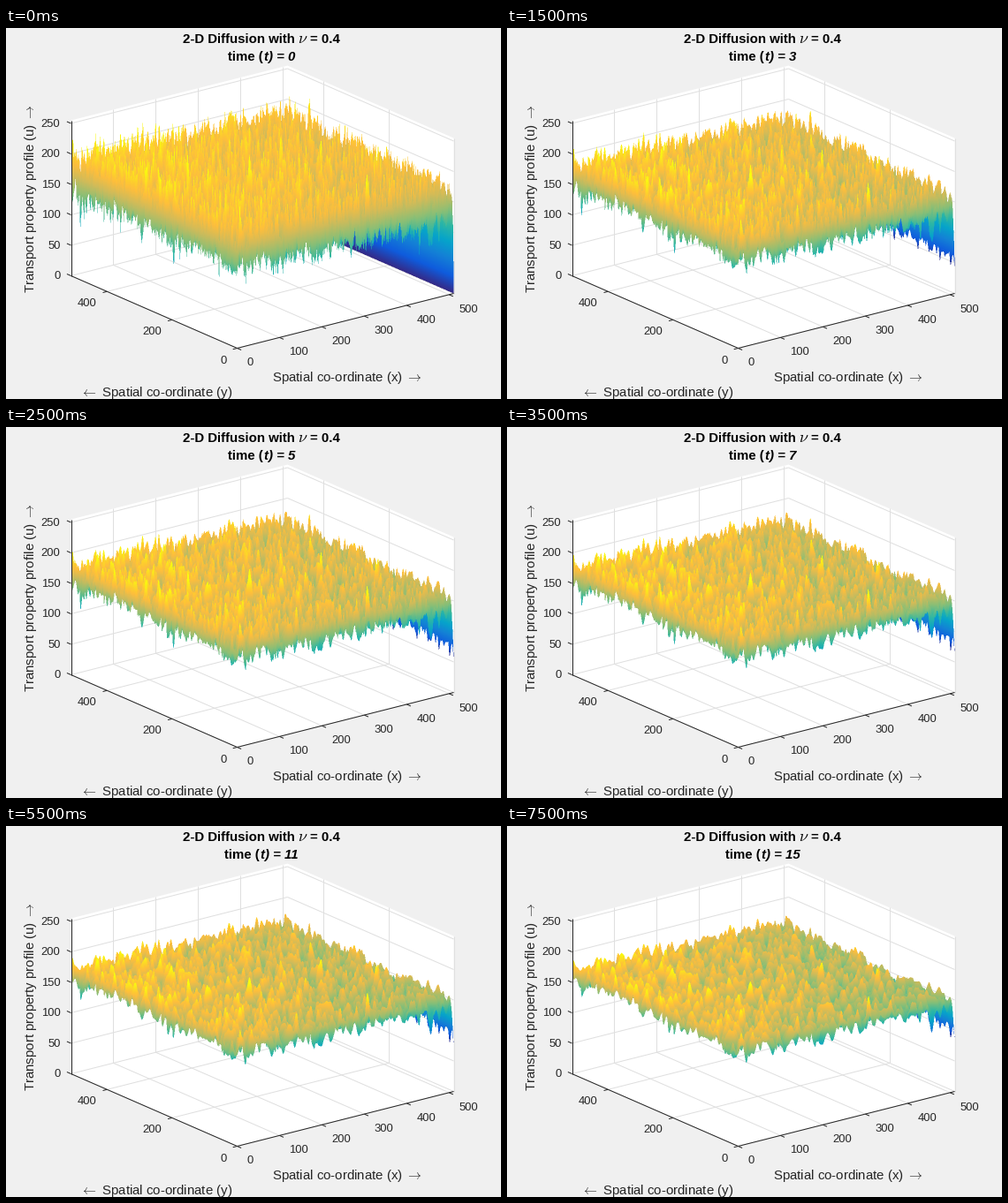
A matplotlib script that plays this animation: 560x420 px, repeating every 8 s.

```python
import numpy as np
import matplotlib.pyplot as plt
from matplotlib.animation import FuncAnimation
from matplotlib.colors import LinearSegmentedColormap

W, H = 560, 420
FRAMES, INTERVAL = 16, 500
INK, GRID = "#262626", "#dfdfdf"

# Orthographic projection: screen position of the near corner and axis steps.
N = 512
SPAN = N - 1
ORIGIN = np.array([261.5, 362.5])
X_STEP = np.array([245, -62]) / SPAN
Y_STEP = np.array([-188, -82]) / SPAN
Z_SCALE, Z_MAX = 0.69, 255

DIFFUSION = 0.23
PARULA = LinearSegmentedColormap.from_list("parula", [
    (0, "#352a87"), (0.125, "#0f5cdd"), (0.25, "#1481d6"),
    (0.375, "#06a4ca"), (0.5, "#2eb7a4"), (0.625, "#87bf77"),
    (0.75, "#d1bb59"), (0.84, "#fdbe3d"), (0.875, "#fec832"),
    (1, "#f9fb0e")])


def project(x, y, z=0):
    px, py = ORIGIN + x * X_STEP + y * Y_STEP
    return px, py - z * Z_SCALE


# Insulated-edge diffusion in a cosine basis.
theta = np.pi * np.arange(N) / N
basis = np.cos(np.outer(theta, np.arange(N) + 0.5)) * np.sqrt(2 / N)
basis[0] /= np.sqrt(2)


def spread(field, variance):
    decay = np.exp(-variance * (1 - np.cos(theta)))
    kernel = basis.T @ (decay[:, None] * basis)
    return kernel @ field @ kernel


def start_profile():
    rng = np.random.default_rng(11)

    def grain(variance, amount):
        g = spread(rng.standard_normal((N, N)), variance)
        return amount * g / g.std()

    y, x = np.mgrid[0:1:N * 1j, 0:1:N * 1j]
    u = 159 + 7 * y - 13 * x
    u += grain(0, 4) + grain(2, 18) + grain(25, 3)
    u = np.clip(u, 0, 245)
    u[:, -1] = 0
    return u


# Vertical cuts through the surface, one per sub-pixel column, front to back.
LEFT, RIGHT, TOP, BOTTOM = 74, 507, 40, 303
SUB, STEPS = 2, 800
cols = LEFT + (np.arange((RIGHT - LEFT) * SUB) + 0.5) / SUB
rows = TOP + (np.arange((BOTTOM - TOP) * SUB) + 0.5) / SUB
offset = cols - ORIGIN[0]
near = np.clip(offset / Y_STEP[0], 0, SPAN)
far = np.clip((offset - X_STEP[0] * SPAN) / Y_STEP[0], 0, SPAN)
cut_y = near[:, None] + (far - near)[:, None] * np.linspace(0, 1, STEPS)
cut_x = np.clip((offset[:, None] - Y_STEP[0] * cut_y) / X_STEP[0], 0, SPAN)
ground = ORIGIN[1] + X_STEP[1] * cut_x + Y_STEP[1] * cut_y
iy = np.minimum(cut_y.astype(int), N - 2)
ix = np.minimum(cut_x.astype(int), N - 2)
fy, fx = cut_y - iy, cut_x - ix
cell = iy * N + ix


def sample(u):
    f = u.ravel()
    front = f[cell] * (1 - fx) + f[cell + 1] * fx
    back = f[cell + N] * (1 - fx) + f[cell + N + 1] * fx
    return front * (1 - fy) + back * fy


def render(u):
    """Floating-horizon view of the surface, coloured by height."""
    v = ground - Z_SCALE * sample(u)
    upper = np.minimum.accumulate(v, axis=1)
    lower = np.maximum.accumulate(v, axis=1)
    z = np.full((rows.size, cols.size), np.nan)
    for c in range(cols.size):
        hit = np.where(rows <= v[c, 0],
                       np.searchsorted(-upper[c], -rows),
                       np.searchsorted(lower[c], rows))
        seen = hit < STEPS
        z[seen, c] = (ground[c, hit[seen]] - rows[seen]) / Z_SCALE
    low, high = u.min(), np.percentile(u, 99.95)
    rgba = PARULA(np.ma.masked_invalid((z - low) / (high - low)))
    rgba = rgba.reshape(BOTTOM - TOP, SUB, RIGHT - LEFT, SUB, 4).mean((1, 3))
    rgba[..., :3] /= np.maximum(rgba[..., 3:], 1e-9)
    return np.clip(rgba, 0, 1)


plt.rcParams["font.family"] = "Liberation Sans"
plt.rcParams["mathtext.fontset"] = "cm"
fig = plt.figure(figsize=(W / 100, H / 100), dpi=100, facecolor="#f0f0f0")
ax = fig.add_axes([0, 0, 1, 1])


def line(a, b, color=INK, z=1):
    ax.plot(*zip(a, b), color=color, lw=0.72, zorder=z,
            solid_capstyle="butt")


def label(x, y, s, px=13, ha="left", color=INK, **kw):
    return ax.text(x, y, s, fontsize=px * 0.72, ha=ha, va="baseline",
                   color=color, zorder=5, **kw)


def draw_box():
    shape = [project(0, SPAN, Z_MAX), project(SPAN, SPAN, Z_MAX),
             project(SPAN, 0, Z_MAX), project(SPAN, 0), project(0, 0),
             project(0, SPAN)]
    ax.fill(*zip(*shape), color="white", lw=0, zorder=0)
    for x in range(0, 501, 100):
        line(project(x, 0), project(x, SPAN), GRID)
        line(project(x, SPAN), project(x, SPAN, Z_MAX), GRID)
    for y in range(0, 401, 200):
        line(project(0, y), project(SPAN, y), GRID)
        line(project(SPAN, y), project(SPAN, y, Z_MAX), GRID)
    for z in range(0, 251, 50):
        line(project(0, SPAN, z), project(SPAN, SPAN, z), GRID)
        line(project(SPAN, SPAN, z), project(SPAN, 0, z), GRID)


def draw_axes():
    line(project(0, 0), project(SPAN, 0), z=4)
    line(project(0, 0), project(0, SPAN), z=4)
    line(project(0, SPAN), project(0, SPAN, Z_MAX), z=4)
    for x in range(0, 501, 100):
        px, py = project(x, 0)
        line((px, py), (px + 4.6, py + 2), z=4)
        label(px + 11, py + 19.8, str(x))
    for y in range(0, 401, 200):
        px, py = project(0, y)
        line((px, py), (px - 4.8, py + 1.2), z=4)
        label(px - 11.6, py + 17, str(y), ha="right")
    for z in range(0, 251, 50):
        px, py = project(0, SPAN, z)
        line((px, py), (px - 4.6, py - 2), z=4)
        label(px - 12, py + 3.6, str(z), ha="right")
    label(301, 400, r"Spatial co-ordinate (x) $\rightarrow$", 15)
    label(84, 416.5, r"$\leftarrow$ Spatial co-ordinate (y)", 15)
    label(32, 300, r"Transport property profile (u) $\rightarrow$", 15,
          rotation=90, rotation_mode="anchor")


def title(x, y, s, ha, px=15, **kw):
    return label(x, y, s, px, ha, "black", weight="bold", **kw)


draw_box()
draw_axes()
title(327, 17, "2-D Diffusion with", "right")
title(336, 17, r"$\nu$", "center", 18)
title(344.5, 17, "= 0.4", "left")
time_head = title(291, 37.5, "time (", "right")
time_tail = title(292, 37.5, "", "left", style="italic")

u0 = start_profile()
surface = ax.imshow(np.zeros((BOTTOM - TOP, RIGHT - LEFT, 4)),
                    extent=(LEFT, RIGHT, BOTTOM, TOP), aspect="auto",
                    interpolation="nearest", zorder=2)
ax.set_xlim(0, W)
ax.set_ylim(H, 0)
ax.axis("off")


def draw(t):
    surface.set_data(render(spread(u0, 2 * DIFFUSION * t)))
    join = 291 if t < 10 else 287
    time_head.set_x(join)
    time_tail.set_x(join + 1)
    time_tail.set_text(f"t) = {t}")
    return surface, time_head, time_tail


anim = FuncAnimation(fig, draw, frames=FRAMES, interval=INTERVAL,
                     repeat=True, repeat_delay=0)
plt.show()
```
